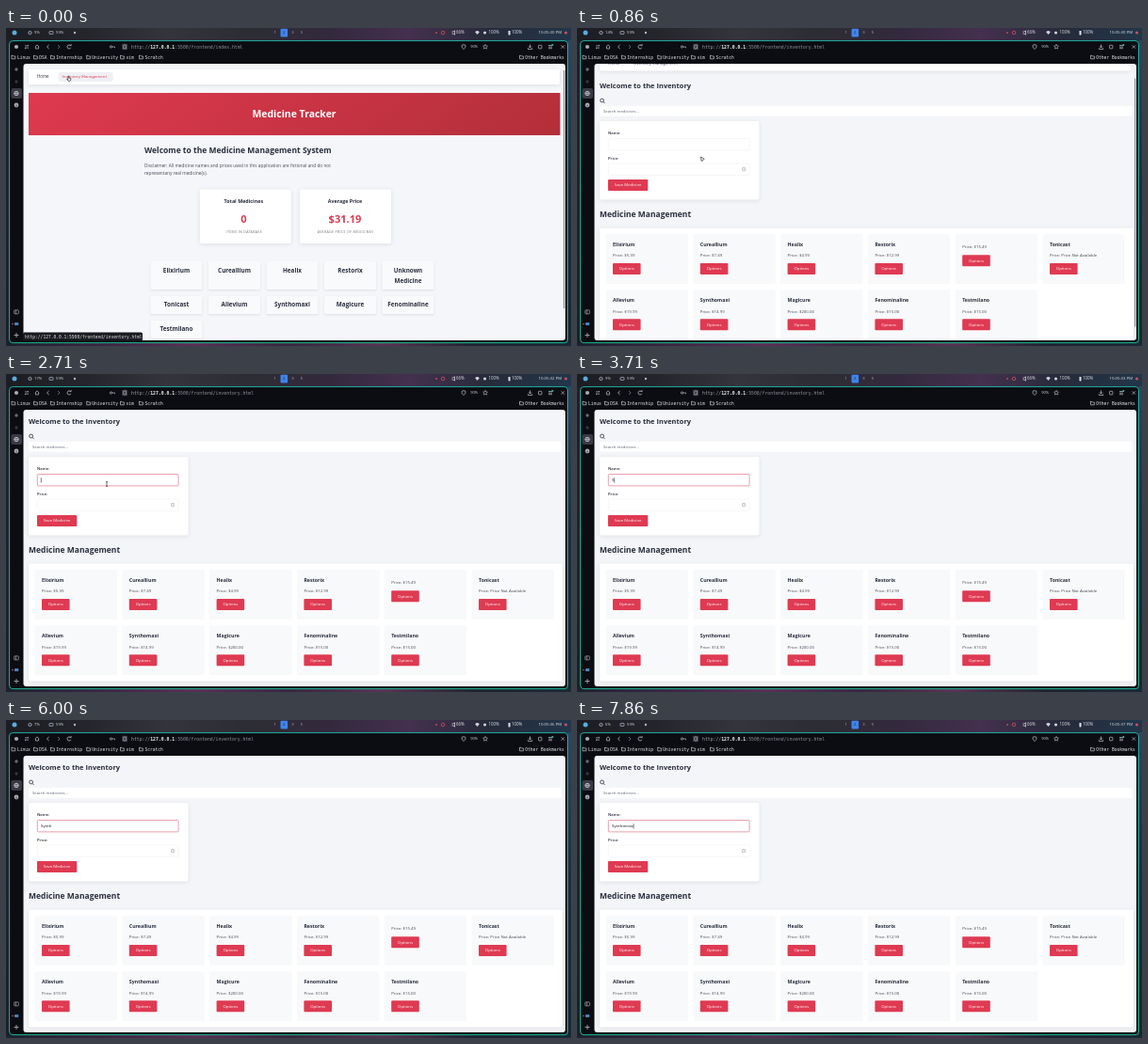
An HTML page with a canvas that plays this animation: 600x338 px, repeating every 8000 ms.

```html
<!DOCTYPE html>
<html lang="en">
<head>
<meta charset="utf-8">
<title>Medicine Tracker</title>
<style>
html, body { margin: 0; width: 100%; height: 100%; overflow: hidden; background: #14131b; }
canvas { display: block; width: 600px; height: 338px; }
</style>
</head>
<body>
<canvas id="stage"></canvas>
<script>
const W = 600, H = 338, LOOP = 8000;
const canvas = document.getElementById('stage');
const ctx = canvas.getContext('2d');
const dpr = window.devicePixelRatio || 1;
canvas.width = W * dpr;
canvas.height = H * dpr;

const SANS = '"Open Sans", "Noto Sans", sans-serif';
const MONO = '"DejaVu Sans Mono", "Noto Sans Mono", monospace';
const INK = '#282d3d', GREY = '#434853', RED = '#df3a52', PALE = '#e2e2e6';
const PAGE_SWITCH = 430, MAX_SCROLL = 25.5, FOCUS_AT = 1430, THUMB_HIDES = 2430;
const WORD = 'Synthomax';
const KEY_TIMES = [3430, 4280, 4570, 5000, 5430, 6290, 6720, 7140, 7570];

const medicines = [
  ['Elixirium', '$5.99'], ['Cureallium', '$7.49'], ['Healix', '$4.99'],
  ['Restorix', '$12.99'], ['', '$15.49'], ['Tonicast', 'Price Not Available'],
  ['Allevium', '$19.99'], ['Synthomaxi', '$14.99'], ['Magicure', '$200.00'],
  ['Fenominaline', '$15.00'], ['Testmilano', '$15.00']
];

// Text is laid out large and scaled down so small sizes keep true widths.
function text(str, x, y, size, color, o = {}) {
  const k = 10;
  ctx.save();
  ctx.translate(x, y + size * 0.34);
  ctx.scale(1 / k, 1 / k);
  ctx.font = `${o.weight || 400} ${size * k}px ${o.family || SANS}`;
  ctx.letterSpacing = (o.spacing || 0) * k + 'px';
  ctx.textAlign = o.align || 'left';
  ctx.fillStyle = color;
  ctx.fillText(str, 0, 0);
  const width = ctx.measureText(str).width / k;
  ctx.restore();
  return width;
}
const bold = (str, x, y, size, color = INK, align = 'left') =>
  text(str, x, y, size, color, { weight: 700, align });
const mono = (str, x, y, size, color, weight = 400) =>
  text(str, x, y, size, color, { family: MONO, weight });

function box(x, y, w, h, r, fill, stroke, line = 0.7) {
  ctx.beginPath();
  ctx.roundRect(x, y, w, h, r);
  if (fill) { ctx.fillStyle = fill; ctx.fill(); }
  if (stroke) { ctx.strokeStyle = stroke; ctx.lineWidth = line; ctx.stroke(); }
}
function card(x, y, w, h, r = 2, blur = 4, fill = '#fff') {
  ctx.save();
  ctx.shadowColor = 'rgba(30,35,60,0.11)';
  ctx.shadowBlur = blur * dpr;
  ctx.shadowOffsetY = dpr;
  box(x, y, w, h, r, fill);
  ctx.restore();
}
function line(color, width, ...pts) {
  ctx.beginPath();
  for (let i = 0; i < pts.length; i += 2) ctx.lineTo(pts[i], pts[i + 1]);
  ctx.strokeStyle = color;
  ctx.lineWidth = width;
  ctx.stroke();
}
function ring(x, y, r, color, width = 0.7, from = 0, to = Math.PI * 2) {
  ctx.beginPath();
  ctx.arc(x, y, r, from, to);
  ctx.strokeStyle = color;
  ctx.lineWidth = width;
  ctx.stroke();
}
function dot(x, y, r, color) {
  ctx.beginPath();
  ctx.arc(x, y, r, 0, Math.PI * 2);
  ctx.fillStyle = color;
  ctx.fill();
}
function gradient(x0, y0, x1, y1, ...colors) {
  const g = ctx.createLinearGradient(x0, y0, x1, y1);
  colors.forEach((c, i) => g.addColorStop(i / (colors.length - 1), c));
  return g;
}

const clamp = v => Math.max(0, Math.min(1, v));
const ease = v => v * v * (3 - 2 * v);

// Keys are [time, ...values]; neighbours are joined with an eased move.
function track(keys, t) {
  if (t <= keys[0][0]) return keys[0].slice(1);
  for (let i = 1; i < keys.length; i++) {
    const a = keys[i - 1], b = keys[i];
    if (t < b[0]) {
      const k = ease(clamp((t - a[0]) / (b[0] - a[0])));
      return a.slice(1).map((v, j) => v + (b[j + 1] - v) * k);
    }
  }
  return keys[keys.length - 1].slice(1);
}

function desktop(t) {
  ctx.fillStyle = gradient(0, 0, W, 0,
    '#1c1d23', '#25262c', '#34353c', '#2c2d34', '#33293d', '#44304f', '#262b3a', '#22364a');
  ctx.fillRect(0, 0, W, H);
  ctx.fillStyle = gradient(0, 0, W, 0,
    '#1b2230', '#3a2743', '#5b3058', '#35283f', '#5a3454', '#1c2431', '#1b2937');
  ctx.fillRect(0, 335, W, 3);
  ctx.fillStyle = gradient(0, 0, 0, H, '#1d2028', '#20232e', '#1a202c');
  ctx.fillRect(0, 13, 3, 322);
  ctx.fillStyle = gradient(0, 0, 0, H, '#2b4a63', '#202b3b', '#1a2430');
  ctx.fillRect(597, 13, 3, 322);

  const cpu = ['9%', '14%', '17%', '9%', '7%', '7%', '6%'];
  const step = [700, 1700, 3000, 4700, 5900, 7400].filter(k => t >= k).length;
  dot(9, 5, 2.5, '#58aede');
  ring(25.5, 5, 1.6, '#b9c4d3', 0.8);
  text(cpu[step], 30, 5, 4.2, PALE);
  box(46, 3.6, 4, 2.8, 0.4, null, '#b9c4d3');
  text('59%', 53, 5, 4.2, PALE);
  dot(73, 5, 1.2, '#aeb8c8');

  box(291.5, 0.8, 7.6, 8.6, 1, '#3f84ee');
  ['1', '2', '3', '5'].forEach((s, i) =>
    text(s, 285.7 + i * 9.4, 5, 4.2, i === 1 ? '#142238' : '#aeb2bd', { align: 'center' }));

  dot(457, 5, 1.1, '#bd4654');
  ring(464, 5, 1.8, '#d2505d', 0.8);
  line('#d2d4da', 0.8, 473.5, 4, 475, 4, 476.5, 2.8, 476.5, 7.2, 475, 6, 473.5, 6);
  text('66%', 478, 5, 4.4, PALE);
  ctx.beginPath();
  ctx.moveTo(500.5, 7);
  ctx.arc(500.5, 6.5, 3.2, -2.4, -0.75);
  ctx.closePath();
  ctx.fillStyle = '#d2d4da';
  ctx.fill();
  dot(508.5, 5, 1.6, '#d2d4da');
  text('100%', 512.5, 5, 4.4, PALE);
  box(533.5, 3, 2, 4.4, 0.4, PALE);
  text('100%', 537, 5, 4.4, PALE);
  const sec = 30 + Math.floor((t + 100) / 1000);
  text(`10:05:${sec} PM`, 565.5, 5, 4.3, PALE);
  dot(594.5, 5, 1.5, '#d45160');
}

function folder(x, y) {
  line('#c6c7cc', 0.7, x, y - 1.7, x + 1.4, y - 1.7, x + 2, y - 1, x + 3.9, y - 1,
    x + 3.9, y + 1.8, x, y + 1.8, x, y - 2);
}

function browser(home) {
  box(3.6, 13.6, 592.9, 321, 3.5, '#0c0d12', gradient(0, 14, 0, 335, '#25bfb4', '#1cc79c'), 0.9);

  const c = '#bfc1c8';
  dot(11, 20, 2.1, '#a9acb5');
  line(c, 0.7, 20, 18.9, 24, 18.9, 23, 18);
  line(c, 0.7, 24, 21.1, 20, 21.1, 21, 22);
  line(c, 0.7, 30.8, 20, 33, 17.9, 35.2, 20);
  line(c, 0.7, 31.5, 19.8, 31.5, 22, 34.5, 22, 34.5, 19.8);
  line(c, 0.8, 45.6, 18, 43.5, 20, 45.6, 22);
  line('#777a83', 0.8, 55, 18, 57.1, 20, 55, 22);
  ring(67, 20, 2, c, 0.8, 0.4, 5.6);
  line(c, 0.7, 67.5, 18.5, 69.2, 18.6, 69.2, 17);
  ring(111.5, 20, 1.1, c);
  line(c, 0.7, 112.6, 20, 115.5, 20, 115.5, 21.2);
  box(123, 16.8, 6.2, 6.5, 1, '#34363f');
  box(124.8, 18, 2.7, 4, 0.3, null, '#c7c9ce', 0.6);

  let x = 133;
  x += mono('http://', x, 20, 4.8, '#9fa1a8');
  x += mono('127.0.0.1', x, 20, 4.8, '#f1f1f3', 700);
  mono(`:5500/frontend/${home ? 'index' : 'inventory'}.html`, x, 20, 4.8, '#8f929a');

  line(c, 0.7, 486, 17.6, 488, 18.4, 487.8, 20.8, 486, 22.5, 484.2, 20.8, 484, 18.4, 486, 17.6);
  text('90%', 493.3, 20, 4, PALE);
  ctx.beginPath();
  for (let i = 0; i <= 10; i++) {
    const a = i * Math.PI / 5 - Math.PI / 2, r = i % 2 ? 1.2 : 2.6;
    ctx.lineTo(509 + Math.cos(a) * r, 20 + Math.sin(a) * r);
  }
  ctx.strokeStyle = c;
  ctx.lineWidth = 0.6;
  ctx.stroke();
  line(c, 0.8, 556.5, 17.5, 556.5, 21);
  line(c, 0.8, 555, 19.5, 556.5, 21, 558, 19.5);
  line(c, 0.7, 554.3, 21.2, 554.3, 22.5, 558.7, 22.5, 558.7, 21.2);
  box(565.5, 18.3, 3.4, 3.6, 0.6, null, c);
  for (let i = 0; i < 3; i++) line(c, 0.7, 576, 18.5 + i * 1.6, 580, 18.5 + i * 1.6);
  dot(580.3, 18, 1, '#35c3a5');
  line(c, 0.7, 589.7, 18.3, 593, 21.7);
  line(c, 0.7, 593, 18.3, 589.7, 21.7);

  [['Linux', 6, 12], ['DSA', 29.5, 35.3], ['Internship', 47.5, 53.3], ['University', 85.7, 91.3],
    ['vim', 121.5, 127.5], ['Scratch', 141.5, 147.5], ['Other Bookmarks', 545.5, 551.3]]
    .forEach(([s, fx, tx]) => { folder(fx, 31); mono(s, tx, 31, 4.6, '#e8e8ec'); });

  box(5.5, 64, 11.5, 11, 2, '#393a45');
  dot(11, 44, 1.7, '#686b77');
  dot(11, 57, 1.7, '#343740');
  ring(11, 69.5, 2.2, '#d7d8df', 0.8);
  line('#d7d8df', 0.6, 8.8, 69.5, 13.2, 69.5);
  line('#d7d8df', 0.6, 11, 67.3, 11, 71.7);
  dot(11, 82, 2.4, '#a7abb5');
  line('#111217', 0.7, 11, 81.5, 11, 83.5);
  box(8.7, 299.8, 4.6, 4, 0.6, null, '#a8aab1');
  line('#a8aab1', 0.7, 10.4, 300, 10.4, 303.8);
  dot(7, 314.5, 0.8, '#d45160');
  box(9, 313, 4.3, 3, 0.7, '#4b82bd');
  line('#b7b9c0', 0.8, 8.5, 326.5, 13.5, 326.5);
  line('#b7b9c0', 0.8, 11, 324, 11, 329);
}

function nav(y, hover) {
  card(24, y - 8, 564, 16, 1.5);
  text('Home', 33, y, 4.4, INK);
  if (hover) box(55.5, y - 5, 58, 10, 2, '#eff0f4');
  text('Inventory Management', 59.5, y, 4.36, hover ? RED : INK);
}

function homePage() {
  nav(52, true);
  ctx.fillStyle = gradient(180, -80, 432, 262, '#e23a50', '#b02e39');
  ctx.fillRect(24, 69, 564.5, 45);
  bold('Medicine Tracker', 306, 91.9, 10.45, '#fff', 'center');
  bold('Welcome to the Medicine Management System', 147, 130.3, 8.5);
  text('Disclaimer: All medicine names and prices used in this application are fictional and do not',
    147, 146, 4.75, GREY);
  text('representany real medicine(s).', 147, 154, 4.75, GREY);

  [['Total Medicines', '0', 'ITEMS IN DATABASE', 252.3, 205.8],
    ['Average Price', '$31.19', 'AVERAGE PRICE OF MEDICINES', 360, 312]].forEach(([head, val, note, cx, left]) => {
    card(left, 171.5, 97, 57.5, 2.5, 5);
    bold(head, cx, 184.5, 5.35, INK, 'center');
    bold(val, cx, 203, 11.1, RED, 'center');
    text(note, cx + 0.5, 216.5, 3.6, '#6f737e', { align: 'center', spacing: 0.32 });
  });

  const names = medicines.map(m => m[0] || 'Unknown Medicine');
  names.forEach((name, i) => {
    const col = i % 5, row = Math.floor(i / 5);
    const cx = 181 + col * 61.5, top = row ? 259 + row * 26 : 248;
    card(cx - 27.5, top, 55, row ? 19 : 30, 1.5, 2.5, '#f9fafb');
    (i === 4 ? name.split(' ') : [name]).forEach((s, j) =>
      bold(s, cx, top + (row ? 9.3 : 10) + j * 10.6, 6.35, INK, 'center'));
  });
}

function button(label, x, y, w) {
  box(x, y - 6, w, 12, 1, RED);
  text(label, x + w / 2, y, 4.3, '#fff', { align: 'center' });
}

// Drawn at its fully scrolled position.
function inventoryPage(t) {
  nav(52 - MAX_SCROLL, false);
  bold('Welcome to the Inventory', 24, 50.3, 7.5);
  ring(26.6, 66, 1.9, INK, 0.8);
  line(INK, 0.8, 28, 67.4, 29.6, 69);
  box(24, 71.5, 566, 11.5, 1.5, '#fff', '#eff0f3', 0.5);
  text('Search medicines...', 28, 77.2, 4.25, '#60646e');

  card(24, 88, 169.5, 83.5, 2, 4);
  text('Name:', 33, 100.5, 4.2, INK, { weight: 600 });
  const focus = t >= FOCUS_AT;
  box(33.3, 106.5, 149.8, 12.4, 1, '#fff', focus ? '#df7686' : '#f1f2f4', 0.7);
  text('Price:', 33, 127.3, 4.2, INK, { weight: 600 });
  box(33.3, 133, 149.8, 12.4, 1, '#fff', '#f1f2f4', 0.7);
  box(175.6, 137.5, 3, 3.3, 0.4, null, '#9da1aa', 0.6);
  line('#9da1aa', 0.5, 176.2, 139.1, 178, 139.1);
  button('Save Medicine', 33, 156, 42.3);

  if (focus) {
    const count = KEY_TIMES.filter(k => t >= k).length;
    const since = t - (count ? KEY_TIMES[count - 1] : FOCUS_AT);
    const w = text(WORD.slice(0, count), 37, 113, 4.35, '#0f1016');
    if (since % 1000 < 500) line('#25262d', 0.6, 37.3 + w, 110.2, 37.3 + w, 115.6);
  }

  bold('Medicine Management', 24, 187.3, 8.5);
  card(24, 201.5, 567, 125, 2, 4);
  medicines.forEach(([name, price], i) => {
    const x = 38 + (i % 6) * 92.8, y = i < 6 ? 0 : 59.3, up = name ? 0 : 8.8;
    box(x - 7.5, y + 208, 87.5, 53, 1.5, '#f8f9fa');
    bold(name, x, y + 219.3, 5.25);
    text('Price: ' + price, x, y + 230.8 - up, 4.35, GREY);
    button('Options', x, y + 245 - up, 29.6);
  });
}

function shape(pts, x, y) {
  ctx.beginPath();
  for (let i = 0; i < pts.length; i += 2) ctx.lineTo(x + pts[i], y + pts[i + 1]);
  ctx.closePath();
  ctx.fillStyle = '#fff';
  ctx.fill();
  ctx.strokeStyle = '#23242b';
  ctx.lineWidth = 0.7;
  ctx.stroke();
}

function pointer(t) {
  if (t >= KEY_TIMES[0]) return;
  const [x, y] = track([[PAGE_SWITCH, 66, 51], [860, 131.5, 137], [1000, 131.5, 137], [1380, 107, 117]], t);
  if (t < PAGE_SWITCH) {
    shape([0, 0, 0.9, 0, 0.9, 2, 2.8, 2.5, 2.8, 4.2, 2.1, 5.3, 0.2, 5.3, -1.4, 3.2, 0, 3.4], x, y);
  } else if (t < 1290) {
    shape([0, 0, 3.7, 2.2, 0.7, 4.6], x, y);
  } else {
    line('#25262d', 0.7, x, y - 2.3, x, y + 2.3);
    line('#25262d', 0.6, x - 1, y - 2.4, x + 1, y - 2.4);
    line('#25262d', 0.6, x - 1, y + 2.4, x + 1, y + 2.4);
  }
}

function draw(t) {
  const home = t < PAGE_SWITCH;
  ctx.setTransform(dpr, 0, 0, dpr, 0, 0);
  desktop(t);
  browser(home);

  ctx.save();
  ctx.beginPath();
  ctx.roundRect(18.5, 38, 575.5, 294, 3);
  ctx.clip();
  ctx.fillStyle = home ? '#f5f6f9' : '#f4f5f8';
  ctx.fillRect(18, 38, 577, 295);
  const [scroll] = track([[500, 0], [860, 14.5], [1140, MAX_SCROLL]], t);
  if (home) {
    homePage();
  } else {
    ctx.translate(0, MAX_SCROLL - scroll);
    inventoryPage(t);
    ctx.translate(0, scroll - MAX_SCROLL);
  }
  if (t < THUMB_HIDES) box(592, home ? 45 : 39 + scroll, 1.3, home ? 253 : 264, 0.6, '#8d9099');
  ctx.restore();

  if (home) {
    box(18, 323.5, 127, 9, 1.5, '#1a1a21');
    mono('http://127.0.0.1:5500/frontend/inventory.html', 20, 328, 4.6, '#e4e4e8');
  }
  pointer(t);
}

const start = performance.now();
function frame() {
  draw((performance.now() - start) % LOOP);
  requestAnimationFrame(frame);
}
frame();
</script>
</body>
</html>
```
